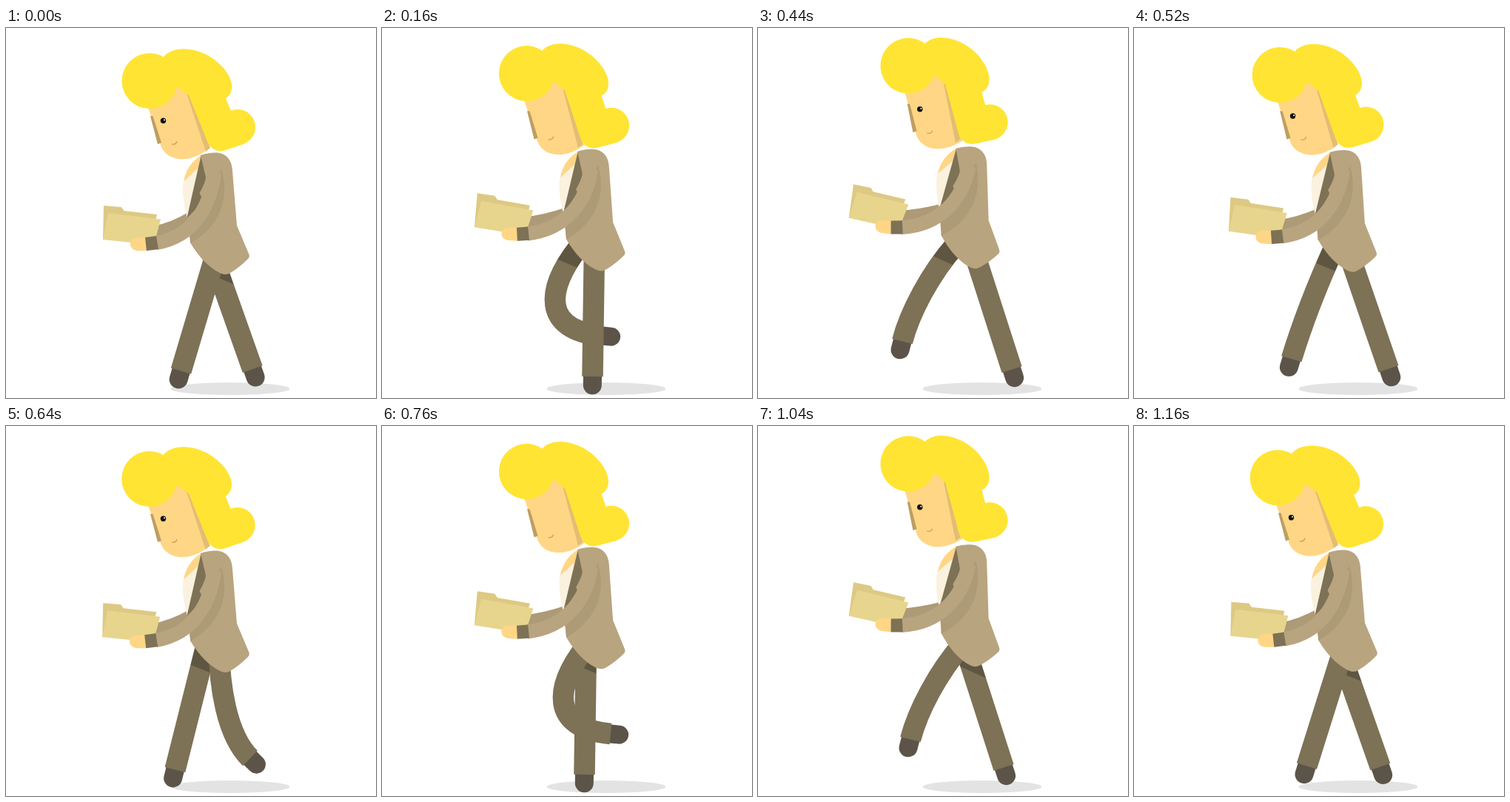
These frames come from a looping animation (500x500 px, 1.2 s). An HTML page with a canvas:

```html
<!DOCTYPE html>
<html>
<head>
<meta charset="utf-8">
<title>Walking with a folder</title>
<style>
html, body { margin: 0; height: 100%; overflow: hidden; background: #fff; }
canvas { display: block; width: 500px; height: 500px; }
</style>
</head>
<body>
<canvas id="stage" width="500" height="500"></canvas>
<script>
const ctx = document.getElementById('stage').getContext('2d');
const LOOP = 1200, STEP = 600, TICK = 40;
const JACKET = '#b8a47f', SHADE = '#ad9a76', TROUSER = '#7d7156', DEEP = '#5f5642',
      SHOE = '#5c5449', SKIN = '#ffd685', HAIR = '#ffe433';

// time, then x, y, angle of: torso, hair, face, folder with hand
const BOUNCE = [
  [0,   0, 0, 0,        0, 0, 0,        0, 0, 0,        0, 0, 0],
  [40,  0, 0, 0,        -.3, 0, 0,      0, 0, 0,        -.8, -.8, 0],
  [160, .3, -4.8, .6,   1.5, -10, 3.8,  1, -6.5, .7,    -4.6, -15.2, 3.5],
  [280, .5, -9.5, 3,    10, -26, 10,    7, -19, 3.5,    -8.1, -34.3, 10.5],
  [440, .5, -8.5, 2.8,  9, -20.5, 6.9,  6.3, -15.5, 3.4, -5.6, -26, 6.7],
  [560, 0, -1, 0,       .2, -1.7, 0,    0, -1.5, 0,     -.6, -2.3, 0]
];
const PIVOTS = [[280, 250], [194, 71], [212.5, 125], [157.3, 261.5]];

// a straight leg, written as the four points of a cubic
const straight = (t, x0, y0, x1, y1) => {
  const row = [t];
  for (let i = 0; i < 4; i++) row.push(x0 + (x1 - x0) * i / 3, y0 + (y1 - y0) * i / 3);
  return row;
};
const STRIDE = [
  straight(0, 286, 297, 236.5, 463.5),
  straight(40, 281.5, 297, 239.5, 464.5),
  straight(160, 287, 297, 284.5, 471),
  straight(280, 288, 290, 328, 465),
  straight(440, 288.5, 292, 343, 461.5),
  straight(560, 286.5, 297, 343.8, 460.5),
  straight(600, 286.5, 298, 344.2, 461),
  [640, 288, 297, 288, 350, 298, 418, 330, 449],
  [760, 277, 296, 233, 352, 226, 408, 309, 416],
  [880, 281, 286, 226, 320, 210, 370, 207, 414.5],
  [1040, 278, 293, 243, 333, 216, 385, 206, 423.5],
  straight(1160, 284.4, 297, 233.5, 459.5)
];

// smooth periodic interpolation through the rows
function sample(rows, period, t) {
  t %= period;
  const n = rows.length;
  const row = i => rows[(i + n) % n];
  const time = i => row(i)[0] + Math.floor(i / n) * period;
  let i = n - 1;
  while (rows[i][0] > t) i--;
  const t0 = time(i), d = time(i + 1) - t0, u = (t - t0) / d;
  const slope = (j, k) => (row(j + 1)[k] - row(j - 1)[k]) / (time(j + 1) - time(j - 1)) * d;
  return row(i).slice(1).map((a, m) => {
    const k = m + 1, b = row(i + 1)[k];
    return a + u * u * (3 - 2 * u) * (b - a)
      + u * (1 - u) * ((1 - u) * slope(i, k) - u * slope(i + 1, k));
  });
}

const fill = (color, d) => { ctx.fillStyle = color; ctx.fill(new Path2D(d)); };
const stroke = (color, width, d, cap = 'butt') => {
  ctx.strokeStyle = color;
  ctx.lineWidth = width;
  ctx.lineCap = cap;
  ctx.stroke(new Path2D(d));
};
const dot = (color, x, y, r) => {
  ctx.fillStyle = color;
  ctx.beginPath();
  ctx.arc(x, y, r, 0, 7);
  ctx.fill();
};

function leg(t, dx) {
  const [ax, ay, bx, by, cx, cy, x, y] = sample(STRIDE, LOOP, t);
  const len = Math.hypot(x - cx, y - cy), ux = (x - cx) / len, uy = (y - cy) / len;
  ctx.setTransform(1, 0, 0, 1, dx, 0);
  stroke(SHOE, 25, `M${x},${y} L${x + 11.7 * ux},${y + 11.7 * uy}`, 'round');
  stroke(TROUSER, 28.5, `M${ax},${ay} C${bx},${by} ${cx},${cy} ${x},${y}`);
}

function draw(t) {
  ctx.resetTransform();
  ctx.clearRect(0, 0, 500, 500);
  const pose = sample(BOUNCE, STEP, t);
  const [torso, hair, face, folder] = PIVOTS.map(([px, py], i) => {
    const [x, y, angle] = pose.slice(i * 3);
    return new DOMMatrix().translate(px + x, py + y).rotate(angle).translate(-px, -py);
  });
  const use = m => ctx.setTransform(m);
  const pt = (m, x, y) => { const p = m.transformPoint({ x, y }); return p.x + ',' + p.y; };

  // far leg, shaded under the jacket hem
  leg(t + 600, -11);
  use(torso);
  ctx.globalCompositeOperation = 'source-atop';
  fill(DEEP, 'M190,299 L350,363 V230 H190 Z');
  ctx.globalCompositeOperation = 'source-over';
  leg(t, 0);

  ctx.resetTransform();
  stroke(SHADE, 18, `M${pt(folder, 198, 277)} Q${pt(folder, 225, 273)} ${pt(torso, 254, 255)}`);

  use(torso);
  fill(SKIN, 'M264,172 Q244,184 240,208 L256,215 L268,180 Z');
  fill('#faf1df', 'M240.5,207 L262,187 L262,230 L245,257 Q238,232 239,212 Z');
  fill(JACKET, 'M263,172 Q272,168.5 283,168.5 C297,168.5 305.5,178 306,193 L312,267 L328,305 ' +
    'Q330,309 327,312 Q315,324 303,331 Q297,335 289,331 Q267,320 249.5,291 L244.5,257 L263,174 Z');
  fill(TROUSER, 'M263.5,174 L270,202 Q269,210 261.5,223 L264,228 L263,238 L244.5,257 Z');
  fill(SHADE, 'M291,190 C304,235 285,270 249,291 L248,272 Z');

  use(folder);
  fill('#ddc984', 'M132,240 L156,242 L159.5,247 L204,252 L200,270 L131,286 Z');
  fill('#e7d58e', 'M138,250 L209,258.5 L200,293 L131,286 Z');

  ctx.resetTransform();
  stroke(JACKET, 19, `M${pt(folder, 203, 290.5)} C${pt(folder, 255, 281)} ` +
    `${pt(torso, 276, 240)} ${pt(torso, 282, 195)}`);

  use(folder);
  fill(SKIN, 'M190,283 L178,283.5 C164,284 165,301 179,301 L190,301 Z');
  fill(TROUSER, 'M188,283 L203,281 L206,299 L190,301 Z');

  use(face);
  fill(SKIN, 'M189,98 L208,155 C214,181 247,185 274,163 L246,80 L200,75 Z');
  fill('#bd9e63', 'M195,119 L198.5,119 L210,155 L205,157 Z');
  stroke('#cfa14f', 1.3, 'M224,157 Q230,158 231,153');
  const blink = t % STEP;
  if (blink < 120 || blink > 200) {
    dot('#111', 212.5, 125.3, 3.7);
    dot('#fff', 214, 124.2, 1);
  }

  use(hair);
  fill('#e3bd76', 'M244,88 L249,90 L276,162 L270,167 Z');
  fill(HAIR, 'M213,39 C228,20 270,27 292,52 C306,67 311,86 297,95 L304,112 L322,156.5 L297,165 ' +
    'C285,169 276,163 272,153 L247,91 L232,80 L200,90 Z');
  dot(HAIR, 194, 71.5, 37.5);
  dot(HAIR, 313, 134, 24);

  // ground shadow goes behind everything
  ctx.resetTransform();
  ctx.globalCompositeOperation = 'destination-over';
  ctx.fillStyle = '#e3e3e3';
  ctx.beginPath();
  ctx.ellipse(303, 487.5, 80.5, 8.5, 0, 0, 7);
  ctx.fill();
  ctx.globalCompositeOperation = 'source-over';
}

const start = performance.now();
function frame() {
  const t = (performance.now() - start) % LOOP;
  draw(Math.floor(t / TICK) * TICK);
  requestAnimationFrame(frame);
}
frame();
</script>
</body>
</html>
```
